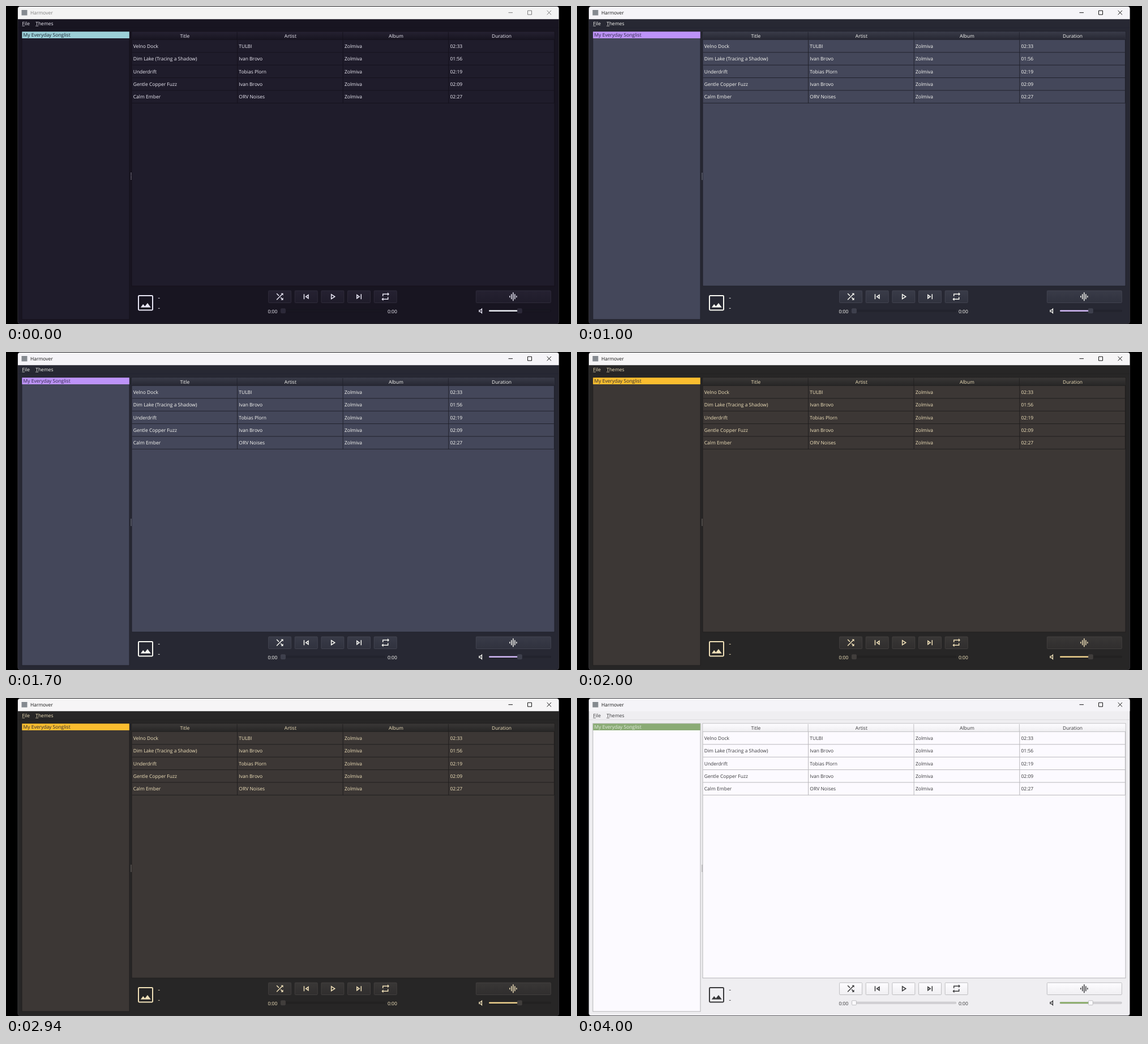
An HTML page for the animation above (5000 ms loop, 998 px wide and 561 px high).

```html
<!DOCTYPE html>
<html lang="en">
<head>
<meta charset="utf-8">
<title>Music player themes</title>
<style>
  html, body { margin: 0; width: 100%; height: 100%; overflow: hidden; background: #000; }
  svg { display: block; width: 100%; height: 100%; }
  text { font: 8.5px "Open Sans", "Noto Sans", sans-serif; fill: var(--text); white-space: pre; text-rendering: geometricPrecision; }
  .mid { text-anchor: middle; }
  .bar { fill: var(--bar); }
  .caption { fill: var(--caption); }
  .control { stroke: var(--caption); fill: none; }
  .window { fill: var(--window); stroke: #45444a; stroke-width: .6; }
  .panel { fill: var(--base); stroke: var(--edge); }
  .line { stroke: var(--grid); fill: none; }
  .rule { stroke: var(--edge); fill: none; }
  .select { fill: var(--select); }
  .picked { fill: var(--picked); }
  .icon { fill: var(--icon); }
  .frame { stroke: var(--icon); fill: none; stroke-width: 2; }
  .button { fill: url(#button); stroke: var(--border); stroke-width: .8; }
  .knob { fill: var(--knob); stroke: var(--border); stroke-width: .8; }
  .groove { fill: var(--groove); stroke: var(--edge); stroke-width: .6; }
  .level { fill: var(--level); }
  .grip { stroke: var(--grip); }
</style>
</head>
<body>
<svg id="stage" viewBox="0 0 998 561" preserveAspectRatio="none">
  <defs>
    <linearGradient id="button" x2="0" y2="1">
      <stop stop-color="var(--top)"/><stop offset="1" stop-color="var(--bottom)"/>
    </linearGradient>
    <linearGradient id="header" x2="0" y2="1">
      <stop stop-color="var(--top)"/><stop offset="1" stop-color="var(--window)"/>
    </linearGradient>
  </defs>
</svg>
<script>
const LOOP = 5000, STEP = 1000;
const stage = document.getElementById("stage");

const themes = [
  { bar: "#f3f3f3", caption: "#7c7c7c", window: "#181521", base: "#1f1c2b", edge: "#14111b", grid: "#15121d",
    text: "#f0eef8", icon: "#e8e6f4", select: "#9ccfd8", picked: "#18222e", top: "#252131", bottom: "#1f1c2a",
    border: "#34303f", knob: "#2b2838", groove: "#1a1723", level: "#eceef4", grip: "#777383" },
  { bar: "#f5f4f8", caption: "#141414", window: "#272833", base: "#44475a", edge: "#20212b", grid: "#22232d",
    text: "#fbfbf6", icon: "#f8f8f2", select: "#bd93f9", picked: "#2c2540", top: "#393b48", bottom: "#30323e",
    border: "#484a56", knob: "#3d3f4c", groove: "#23242e", level: "#d3baf8", grip: "#777a88" },
  { bar: "#f6f5f6", caption: "#141414", window: "#272626", base: "#3c3735", edge: "#201f1f", grid: "#211f1f",
    text: "#f3e4bd", icon: "#f0e0b8", select: "#fabd2f", picked: "#242732", top: "#393736", bottom: "#302e2e",
    border: "#484543", knob: "#403d3b", groove: "#232222", level: "#eed18e", grip: "#77716a" },
  { bar: "#f6f6f7", caption: "#141414", window: "#282b33", base: "#353a44", edge: "#20232a", grid: "#20232a",
    text: "#c0c5cf", icon: "#bbc0ca", select: "#98c379", picked: "#243028", top: "#393c44", bottom: "#31343b",
    border: "#484b53", knob: "#41444c", groove: "#23262d", level: "#dcdca0", grip: "#747983" },
  { bar: "#f5f4f8", caption: "#141414", window: "#efeef1", base: "#fcfaff", edge: "#b4b3b6", grid: "#b9b8bb",
    text: "#38383a", icon: "#38383a", select: "#8aab75", picked: "#e4ecdf", top: "#fdfcff", bottom: "#f0eff2",
    border: "#b2b1b4", knob: "#fbfafd", groove: "#d5d4d7", level: "#86ab62", grip: "#99989b" }
];

const songs = [
  ["Velno Dock", "TULBI", "02:33"],
  ["Dim Lake (Tracing a Shadow)", "Ivan Brovo", "01:56"],
  ["Underdrift", "Tobias Plorn", "02:19"],
  ["Gentle Copper Fuzz", "Ivan Brovo", "02:09"],
  ["Calm Ember", "ORV Noises", "02:27"]
];

const icons = {
  shuffle: "M10.6 9.2 5.4 4 4 5.4l5.2 5.2zM14.5 4l2 2L4 18.6 5.4 20 18 7.5l2 2V4zm.3 9.4-1.4 1.4 3.1 3.1-2 2.1H20v-5.5l-2 2z",
  previous: "M6 6h2v12H6zm3.5 6 8.5 6V6zm6.5 2.1L13 12l3-2.1z",
  play: "M8 5v14l11-7zm2 3.6 5.3 3.4-5.3 3.4z",
  next: "M6 18l8.5-6L6 6zm2-8.1 3 2.1-3 2.1zM16 6h2v12h-2z",
  repeat: "M7 7h10v3l4-4-4-4v3H5v6h2zm10 10H7v-3l-4 4 4 4v-3h12v-6h-2z",
  wave: "M7 6h2v12H7zm4-4h2v20h-2zm-8 8h2v4H3zm12-4h2v12h-2zm4 4h2v4h-2z",
  volume: "M14 8.8v6.4L11.8 13H9v-2h2.8zM16 4l-5 5H7v6h4l5 5z"
};

function add(tag, attrs, content) {
  const node = document.createElementNS("http://www.w3.org/2000/svg", tag);
  for (const key in attrs) node.setAttribute(key, attrs[key]);
  if (content) node.textContent = content;
  return stage.appendChild(node);
}
const rect = (cls, x, y, width, height, rx = 0, extra = {}) =>
  add("rect", { class: cls, x, y, width, height, rx, ...extra });
const path = (cls, d, extra = {}) => add("path", { class: cls, d, ...extra });
const label = (content, x, y, cls = "") => add("text", { x, y, class: cls }, content);
const icon = (name, x, y, size = .75) => path("icon", icons[name], {
  "fill-rule": "evenodd",
  transform: `translate(${x} ${y}) scale(${size}) translate(-12 -12)`
});

function drawWindow() {
  rect("window", 20.8, .8, 955.8, 559.8, 4);
  path("bar", "M21 23.3V5q0-4 4-4h947.5q4 0 4 4v18.3z");
  rect("", 27.5, 7, 10, 9.5, 0, { fill: "#858a90" });
  label("Harmover", 43, 14.9, "caption");
  path("control", "M887.5 11.7h7.5M921.5 8.2h7v7h-7zM955.6 8l7.4 7.4m0-7.4-7.4 7.4");
  label("File", 28.5, 33.6);
  label("Themes", 52.2, 33.6);
  path("", "M28.5 35.2h4.5M52.2 35.2h5", { stroke: "var(--text)", "stroke-width": .7 });
  path("rule", "M21 38.3h955.5", { "stroke-width": .6, opacity: .6 });
}

function drawLists() {
  rect("panel", 28, 45, 190, 508);
  rect("select", 28.3, 45.2, 189.5, 11.8);
  label("My Everyday Songlist", 30.5, 54.4, "picked");

  rect("panel", 222, 45, 747, 449);
  rect("", 222.5, 45.5, 746, 13.7, 0, { fill: "url(#header)" });
  const columns = [222, 408.6, 595.2, 781.8], pitch = 22.35;
  ["Title", "Artist", "Album", "Duration"].forEach((name, i) =>
    label(name, columns[i] + 93.8, 56, "mid"));
  path("rule", "M222 59.4h747M408.2 46v13M594.8 46v13M781.4 46v13", { "stroke-width": .8 });
  songs.forEach(([title, artist, time], row) => {
    const y = 59.5 + pitch * row;
    [title, artist, "Zolmiva", time].forEach((value, i) => label(value, columns[i] + 2.7, y + 14.4));
    path("line", `M222.5 ${y + pitch}H968.5`);
  });
  for (const x of [...columns.slice(1), 968.4]) path("line", `M${x} 59.5v${pitch * 5}`);
  path("grip", "M221 294v13", { id: "grip" });
}

function drawPlayer() {
  rect("frame", 234, 511, 25, 25.4, 1.4);
  path("icon", "M237.8 531.8l4.4-5.8 3.2 3.8 4.6-5.8 5.8 7.8z");
  path("", "M268.8 515.4h2.8M268.8 533.4h2.8", { stroke: "var(--text)", "stroke-width": .9 });

  ["shuffle", "previous", "play", "next", "repeat"].forEach((name, i) => {
    const x = 483.6 + 46.65 * i;
    rect("button", x - 20, 502.3, 40, 21.2, 1.2);
    icon(name, x, 512.7);
  });
  rect("button", 830.3, 502.3, 132, 21.2, 1.2);
  icon("wave", 895.8, 512.7);

  label("0:00", 462.5, 541.7);
  label("0:00", 674, 541.7);
  rect("groove", 486, 536.3, 183.5, 3, 1);
  rect("knob", 485.6, 533.9, 7.8, 7.8, 1.2);
  icon("volume", 838.5, 538, .65);
  rect("groove", 853, 536.3, 109, 3, 1);
  rect("level", 853, 536.5, 53, 2.5, 1);
  rect("knob", 903.4, 533.9, 7.8, 7.8, 1.2);
}

let current = -1;
function update(time) {
  const index = Math.floor(time % LOOP / STEP);
  if (index === current) return;
  current = index;
  for (const [key, value] of Object.entries(themes[index])) stage.style.setProperty("--" + key, value);
  const grip = document.getElementById("grip");
  grip.setAttribute("stroke-dasharray", index ? "none" : "1.2 1");
  grip.setAttribute("stroke-width", index ? 1 : 1.8);
}

drawWindow();
drawLists();
drawPlayer();
const start = performance.now();
function tick() {
  update(performance.now() - start);
  requestAnimationFrame(tick);
}
tick();
</script>
</body>
</html>
```
